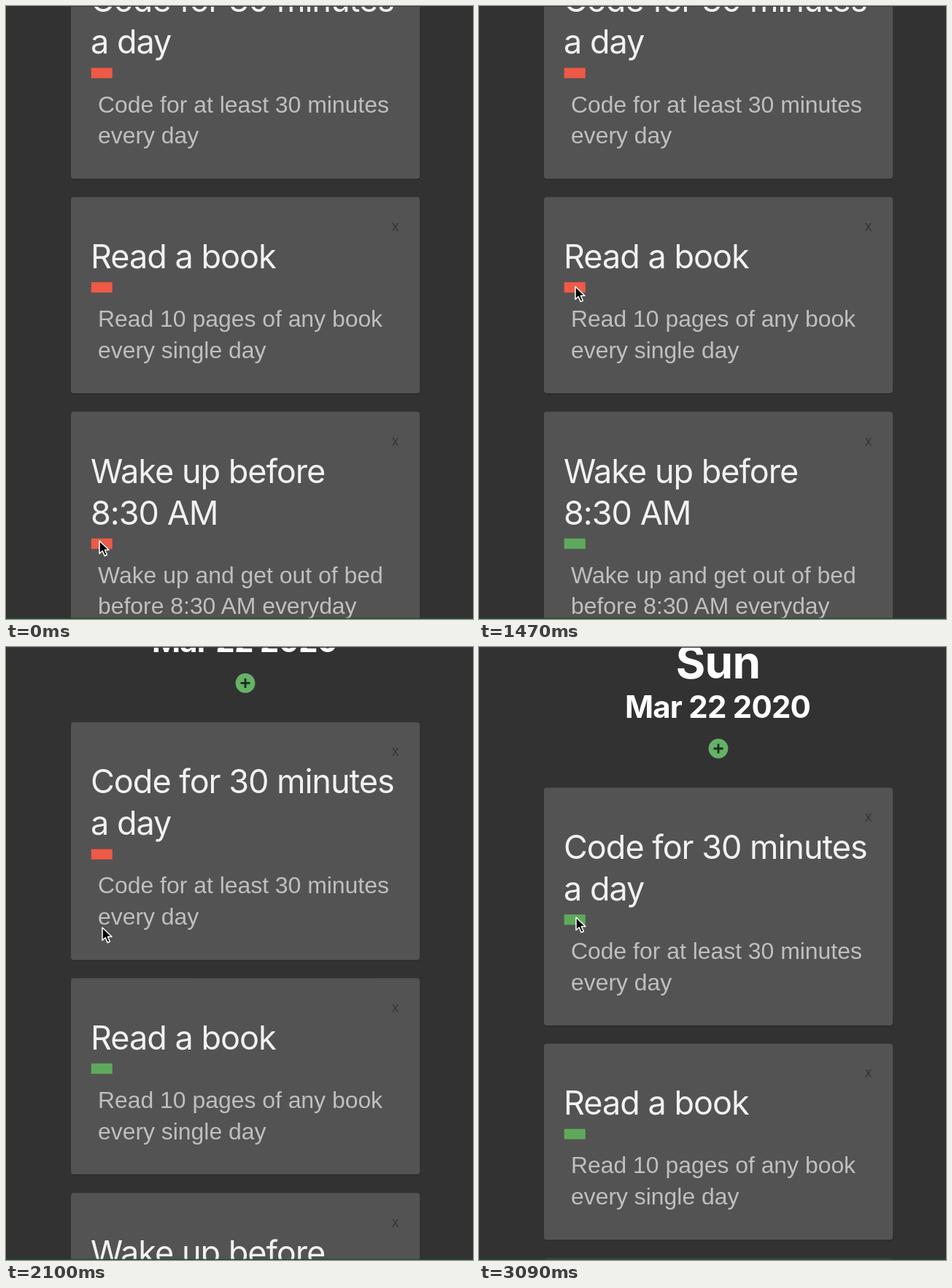
These frames come from a looping animation (640x839 px, 3.12 s). An HTML page:

```html
<!DOCTYPE html>
<html lang="en">
<head>
<meta charset="utf-8">
<style>
  html, body { margin: 0; width: 100%; height: 100%; overflow: hidden; background: #323232; }
  svg { display: block; width: 640px; height: 839px; }
  text { white-space: pre; font-optical-sizing: none; }
  .title { font: 400 45px Inter, sans-serif; letter-spacing: -1px; fill: #f1f1f1; }
  .body { font: 31.9px "Liberation Sans", Arial, sans-serif; fill: #bfbfbf; }
  .close { font: 300 19px Inter, sans-serif; fill: #303030; text-anchor: middle; }
  .day { font: 700 62px Inter, sans-serif; letter-spacing: -.8px; fill: #fff; text-anchor: middle; }
  .date { font: 700 42px Inter, sans-serif; letter-spacing: -.8px; fill: #fff; text-anchor: middle; }
</style>
</head>
<body>
<svg viewBox="0 0 640 839">
  <rect width="640" height="839" fill="#323232"/>
  <g id="page">
    <text class="day" x="327.5" y="-239">Sun</text>
    <text class="date" x="327" y="-184.7">Mar 22 2020</text>
    <circle cx="328" cy="-142.5" r="13.4" fill="#66b168"/>
    <path d="M321.5 -142.5h13M328 -149v13" stroke="#16301a" stroke-width="2.8"/>
  </g>
  <path d="M0 .5h640" stroke="#3b3b3b"/>
  <rect y="837.6" width="640" height="1.4" fill="#1a551e"/>
  <path id="arrow" d="M0 0V17.5L4.2 13.7L7.2 20.6L10.4 19.2L7.4 12.5H13Z"
        fill="#050505" stroke="#fff" stroke-width="1.5" stroke-linejoin="round"/>
  <g id="beam" fill="none" stroke-linecap="round">
    <path d="M-4 -9Q0 -9 0 -6Q0 -9 4 -9M0 -6V6M-4 9Q0 9 0 6Q0 9 4 9M-2 3H2" stroke="#f4f4f4" stroke-width="3.4"/>
    <path d="M-4 -9Q0 -9 0 -6Q0 -9 4 -9M0 -6V6M-4 9Q0 9 0 6Q0 9 4 9M-2 3H2" stroke="#222" stroke-width="1.2"/>
  </g>
</svg>
<script>
const LOOP = 3120;
const RED = '#ed5a47', GREEN = '#5fa95d';
const byId = id => document.getElementById(id);
const page = byId('page'), arrow = byId('arrow'), beam = byId('beam');

function add(name, attrs, content = '') {
  const node = document.createElementNS('http://www.w3.org/2000/svg', name);
  for (const key in attrs) node.setAttribute(key, attrs[key]);
  node.textContent = content;
  page.append(node);
  return node;
}

// Each card grows by one title line height when its title wraps.
function addCard(top, title, body, doneAt) {
  const extra = (title.length - 1) * 57;
  const box = { x: 89, width: 478, height: 268.5 + extra, rx: 4 };
  add('rect', { ...box, y: top + 1.5, fill: '#292929' });
  add('rect', { ...box, y: top, fill: '#535353' });
  add('text', { class: 'close', x: 533.5, y: top + 46.5 }, 'x');
  title.forEach((line, i) => add('text', { class: 'title', x: 116, y: top + 97.4 + i * 57 }, line));
  body.forEach((line, i) => add('text', { class: 'body', x: 126, y: top + 177.5 + extra + i * 42.7 }, line));
  const badge = add('rect', {
    x: 116.5, y: top + 116.4 + extra, width: 29.5, height: 14.6,
    stroke: '#484848', 'stroke-opacity': .4, 'stroke-width': .8
  });
  return { badge, doneAt };
}

const cards = [
  addCard(-89, ['Code for 30 minutes', 'a day'], ['Code for at least 30 minutes', 'every day'], 2640),
  addCard(261.4, ['Read a book'], ['Read 10 pages of any book', 'every single day'], 1710),
  addCard(555.2, ['Wake up before', '8:30 AM'], ['Wake up and get out of bed', 'before 8:30 AM everyday'], 360)
];

const scrollKeys = [[1950, 0], [1980, 5.2], [2010, 35], [2040, 88], [2070, 143], [2100, 191],
  [2130, 220], [2160, 241], [2220, 266], [2300, 279], [2370, 281.5]];

function track(keys, t) {
  if (t <= keys[0][0]) return keys[0][1];
  for (let i = 1; i < keys.length; i++) {
    const [t0, v0] = keys[i - 1], [t1, v1] = keys[i];
    if (t <= t1) return v0 + (v1 - v0) * (t - t0) / (t1 - t0);
  }
  return keys[keys.length - 1][1];
}

function ease(t, start, end) {
  const p = Math.min(1, Math.max(0, (t - start) / (end - start)));
  return p * p * (3 - 2 * p);
}

function render(t) {
  page.setAttribute('transform', `translate(0 ${track(scrollKeys, t)})`);
  for (const { badge, doneAt } of cards) badge.setAttribute('fill', t < doneAt ? RED : GREEN);

  const rise = ease(t, 560, 1165), nudge = ease(t, 2250, 2430);
  const x = 128 + 4 * rise + 12 * Math.sin(Math.PI * rise) + nudge;
  const y = 732 - 348 * rise - 14 * nudge;
  const overText = (y > 608 && y < 718) || (y > 408 && y < 494);
  arrow.setAttribute('visibility', overText ? 'hidden' : 'visible');
  beam.setAttribute('visibility', overText ? 'visible' : 'hidden');
  for (const pointer of [arrow, beam]) pointer.setAttribute('transform', `translate(${x} ${y})`);
}

const started = performance.now();
function tick() {
  render((performance.now() - started) % LOOP);
  requestAnimationFrame(tick);
}
tick();
</script>
</body>
</html>
```
